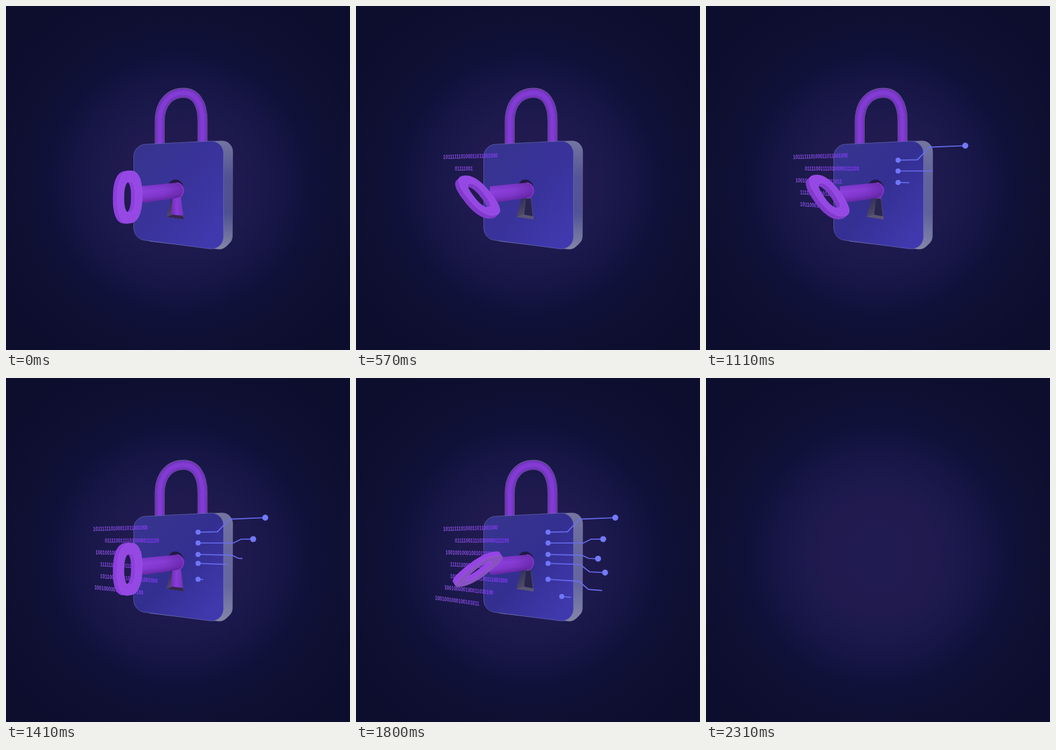
An HTML page with a canvas that plays this animation: 540x540 px, repeating every 4530 ms.

```html
<!DOCTYPE html>
<html lang="en">
<head>
<meta charset="utf-8">
<title>Lock and key</title>
<style>
html, body { margin: 0; width: 100%; height: 100%; overflow: hidden; background: #0d0e2f; }
canvas { display: block; width: 100vw; height: 100vh; }
</style>
</head>
<body>
<canvas id="stage" width="540" height="540"></canvas>
<script>
const ctx = document.getElementById('stage').getContext('2d');
const LOOP = 4530, STEP = 30, GONE = 2310, BEAT = 180, GROW = 450;

const ROWS = [
  '       101111110100011011001000',
  '                 011110011110100000111100',
  '         10010010001001011011',
  '             1111110001011101',
  '             1011000101110100111001000',
  '        100100000100011010100',
  '1001001000100101011'
];

// start height, knee x, drop at the knee, end x, start x
const TRACES = [
  [242, 332, -19.5, 407], [259, 357, -6, 388], [277, 354, 5, 380], [291, 352, 11, 391],
  [316, 350, 12, 390.5], [343, 370, 0, 416, 323], [360, 341, 0, 383]
];

const clamp = v => Math.max(0, Math.min(1, v));
const ease = (t, from, to) => { const u = clamp((t - from) / (to - from)); return u * u * (3 - 2 * u); };
const mix = (a, b, k) => `rgb(${a.map((v, i) => Math.round(v + (b[i] - v) * k))})`;

// Slope of horizontal lines on the lock's front plane
const tilt = y => -0.02 + (y - 241) * 0.0011;

// Turn of the key in degrees: unlock, swing far back, relax
const keyTurn = t => 41 * ease(t, 30, 270) - 97 * ease(t, 1020, 1880) + 9 * ease(t, 1900, GONE);

function shade(gradient, colors) {
  colors.forEach((color, i) => gradient.addColorStop(i / (colors.length - 1), color));
  return gradient;
}

const linear = (x0, y0, x1, y1, ...colors) => shade(ctx.createLinearGradient(x0, y0, x1, y1), colors);

function polygon(points, fill) {
  ctx.beginPath();
  points.forEach(p => ctx.lineTo(...p));
  ctx.closePath();
  if (fill) { ctx.fillStyle = fill; ctx.fill(); }
}

function disc(x, y, rx, fill, ry = rx) {
  ctx.beginPath();
  ctx.ellipse(x, y, rx, ry, 0, 0, Math.PI * 2);
  ctx.fillStyle = fill;
  ctx.fill();
}

function roundedShape(points, radius, fill, line) {
  const last = points[points.length - 1], first = points[0];
  ctx.beginPath();
  ctx.moveTo((last[0] + first[0]) / 2, (last[1] + first[1]) / 2);
  points.forEach((p, i) => ctx.arcTo(...p, ...points[(i + 1) % points.length], radius));
  ctx.closePath();
  ctx.fillStyle = fill;
  ctx.fill();
  ctx.strokeStyle = line;
  ctx.lineWidth = 0.8;
  ctx.stroke();
}

function drawBackground() {
  ctx.fillStyle = shade(ctx.createRadialGradient(272, 279, 0, 272, 279, 330),
    ['#201b50', '#201b50', '#211a4f', '#1b194c', '#161545', '#10113a', '#0f1033', '#0e0f30', '#0d0e2e']);
  ctx.fillRect(0, 0, 540, 540);
}

function drawShackle() {
  const arch = new Path2D('M241.3 222V180C242 150 259 136.3 279 136.3C297 136.3 308.5 152 308.5 180V220');
  ['#75688f', '#6c30b6', '#7836c6', '#823cd4'].forEach((color, i) => {
    ctx.lineWidth = [15.4, 14.2, 11.5, 6][i];
    ctx.strokeStyle = color;
    ctx.stroke(arch);
  });
}

function drawBody(t) {
  const glow = ease(t, 300, 1500);
  roundedShape([[214, 218], [341, 211.5], [356, 216], [355.5, 368], [340, 382.5], [214, 368]], 17,
    linear(0, 212, 0, 382, '#74759f', mix([80, 82, 148], [103, 104, 160], glow),
      mix([78, 80, 146], [101, 102, 160], glow), '#8486a6'),
    'rgba(140,142,180,.4)');
  roundedShape([[200.5, 218], [341.5, 211], [341.5, 384], [200.5, 365.5]], 19,
    linear(205, 235, 340, 350, '#37348f', mix([57, 51, 155], [51, 47, 145], glow), '#4039ae'),
    'rgba(126,128,190,.6)');
}

function drawKeyhole(angle) {
  const slot = [[260, 300], [252, 331], [279, 335], [275, 300]];
  const lip = [[252, 331], [262, 327.5], [278, 330], [279, 335]];
  disc(266, 287, 13, '#211944', 14.5);
  polygon(slot, linear(254, 306, 275, 336, '#332f5c', '#4a4666', '#5f5b78'));
  polygon([[267, 303], [264, 327], [278, 333], [274, 303]], '#29254f');
  polygon(lip, '#595572');

  // The bit turns away behind the front plate
  ctx.save();
  polygon(slot);
  ctx.clip();
  ctx.translate(268, 290);
  ctx.rotate(-angle * 1.4);
  polygon([[-6, 4], [-9, 38], [10, 39], [6, 4]], linear(-9, 0, 9, 0, '#6d2bb4', '#8a3dd8', '#7a32c8'));
  ctx.restore();
  if (Math.abs(angle) < 0.35) polygon(lip, '#352653');
}

function drawTrace([y, knee, drop, end, x = 301.5], i, t) {
  // One beat of rest after the fifth trace
  const grown = (t - 650 - BEAT * (i > 4 ? i + 1 : i)) / GROW;
  if (grown <= 0) return;
  const bend = knee + 9 + Math.abs(drop) / 2;
  const kneeY = y + (knee - x) * tilt(y), bendY = kneeY + drop + (bend - knee) * tilt(y);
  const points = [[x, y], [knee, kneeY], [bend, bendY], [end, bendY + (end - bend) * tilt(bendY)]];
  const length = points.slice(1).reduce((sum, p, j) => sum + Math.hypot(p[0] - points[j][0], p[1] - points[j][1]), 0);

  ctx.beginPath();
  points.forEach(p => ctx.lineTo(...p));
  ctx.setLineDash([length * clamp(grown), length + 1]);
  ctx.strokeStyle = '#696ef0';
  ctx.lineWidth = 1.7;
  ctx.stroke();
  ctx.setLineDash([]);
  disc(x, y, 4, '#7176f8');
  if (grown >= 1) disc(...points[3], 4.7, '#747af8');
}

function drawRow(row, i, t) {
  const y = 240.5 + 17.9 * i, indent = row.lastIndexOf(' ') + 1;
  const typed = Math.floor((row.length - indent) * clamp((t - 330 - i * BEAT) / BEAT));
  ctx.save();
  ctx.transform(0.705, tilt(y), 0, 1, 124, y);
  ctx.font = 'bold 9.4px "Liberation Sans", Arial, sans-serif';
  ctx.fillStyle = linear(0, 0, 160, 0, '#8556d2', '#8447e2', '#8634fa');
  ctx.fillText(row.slice(0, indent + typed), 0, 0);
  ctx.restore();
}

function drawShaft() {
  const shaft = new Path2D('M210 283L267 277.5C284 277.5 284 301 267 301.5L218 309L210 308Z');
  ctx.fillStyle = linear(240, 280, 243, 306, '#7c37c8', '#8d40dd', '#8338d0', '#6428a4');
  ctx.fill(shaft);
  ctx.fillStyle = linear(215, 0, 281, 0, 'rgba(80,25,135,0)', 'rgba(80,25,135,.1)', 'rgba(80,25,135,.5)');
  ctx.fill(shaft);
  ctx.beginPath();
  ctx.ellipse(268, 289.5, 10.5, 12, 0, -Math.PI / 2, Math.PI / 2);
  ctx.strokeStyle = '#8038c6';
  ctx.lineWidth = 1.6;
  ctx.stroke();
}

function drawBow(angle) {
  const s = Math.sin(angle), c = Math.cos(angle);
  const along = [-19.5, 2], up = [36 * s, 41 * c], normal = [3.5 * c, -4 * s];
  const round = v => Math.sign(v) * Math.abs(v) ** 0.82;

  const ring = (u, v, depth) => {
    for (let i = 0; i < 64; i++) {
      const a = i / 32 * Math.PI, p = u * round(Math.cos(a)), q = v * round(Math.sin(a));
      const at = k => along[k] * p + up[k] * q + normal[k] * depth;
      ctx[i ? 'lineTo' : 'moveTo'](190.8 + at(0), 300 + at(1));
    }
    ctx.closePath();
  };
  const slice = (depth, fill) => {
    ctx.beginPath();
    ring(1, 1, depth);
    ring(0.46, 0.6, depth);
    ctx.fillStyle = fill;
    ctx.fill('evenodd');
  };

  const rim = mix([142, 64, 222], s > 0 ? [122, 56, 194] : [152, 70, 230], Math.abs(s));
  for (let d = -1; d < 1; d += 0.2) slice(d, rim);
  slice(1, mix([150, 72, 228], [136, 82, 190], clamp(-s * 1.15)));
  ctx.strokeStyle = 'rgba(184,120,246,.35)';
  ctx.lineWidth = 0.7;
  ctx.stroke();
}

function draw(t) {
  drawBackground();
  if (t >= GONE) return;
  // Everything rests for a moment once the key has turned
  if (t > 360 && t < 510) t = 360;
  const angle = keyTurn(t) * Math.PI / 180;
  drawShackle();
  drawBody(t);
  drawKeyhole(angle);
  TRACES.forEach((trace, i) => drawTrace(trace, i, t));
  ROWS.forEach((row, i) => drawRow(row, i, t));
  drawShaft();
  drawBow(angle);
}

const begin = performance.now();
function tick() {
  const t = (performance.now() - begin) % LOOP;
  draw(Math.floor(t / STEP) * STEP);
  requestAnimationFrame(tick);
}
tick();
</script>
</body>
</html>
```
